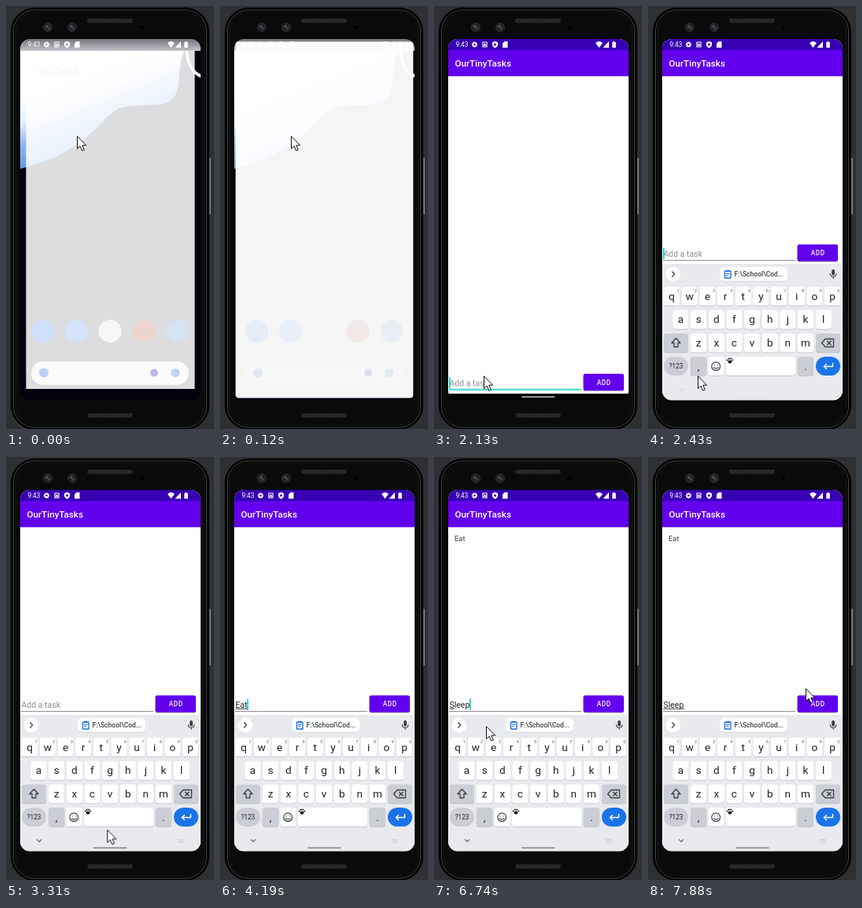
Animation of 264 by 538 pixels, one loop 8000 ms. Source, as an HTML page:

```html
<!DOCTYPE html>
<html lang="en">
<head>
<meta charset="utf-8">
<title>To-do app on a phone</title>
<style>
html, body { margin: 0; width: 100%; height: 100%; overflow: hidden; background: #302f33; }
svg { display: block; width: 264px; height: 538px; font-family: Roboto, sans-serif; }
.medium { font-weight: 500; }
.line { fill: none; stroke: currentColor; stroke-linecap: round; stroke-linejoin: round; }
.mid { text-anchor: middle; }
#pointer, #splash, #icons, #app, #field, #keyboard, #nav, #home, #status {
  animation: 8s step-end infinite;
}
#splash { animation-name: open; transform-origin: 132.2px 272px; }
@keyframes open {
  0% { transform: scale(.935); opacity: .865; }
  1.5% { transform: scale(.985); opacity: .96; }
  3.125%, 100% { transform: none; opacity: 1; }
}
#icons { animation-name: leave; }
@keyframes leave {
  0% { opacity: 1; }
  1.5% { opacity: .35; }
  3.125%, 100% { opacity: 0; }
}
#app { animation-name: reveal; }
@keyframes reveal {
  0% { opacity: 0; transform: translateY(1px); }
  12.19% { opacity: 1; transform: translateY(1px); }
  14.12%, 100% { opacity: 1; transform: none; }
}
#status { animation-name: tint; }
@keyframes tint {
  0% { color: #fff; }
  3.125% { color: #40335c; }
  15.6%, 100% { color: #fff; }
}
#field { animation-name: lift; }
@keyframes lift {
  0% { transform: translateY(164.5px); }
  30.3%, 100% { transform: none; }
}
#keyboard { animation-name: rise; }
@keyframes rise {
  0% { transform: translateY(180px); }
  28.45% { transform: translateY(80px); }
  30.3%, 100% { transform: none; }
}
#nav { animation-name: settle; }
@keyframes settle {
  0% { opacity: .15; }
  32.2%, 100% { opacity: 1; }
}
#home { animation-name: home; }
@keyframes home {
  0% { fill: transparent; }
  3.125% { fill: #999; }
  14.12% { fill: #eee; }
  30.3% { fill: #dfe1e4; }
  32.2%, 100% { fill: #6b6d70; }
}
#pointer { animation-name: wander; }
@keyframes wander {
  0% { transform: translate(90px, 165px); }
  3.25% { transform: translate(90px, 165px); animation-timing-function: steps(6, start); }
  14% { transform: translate(83px, 495.5px); }
  15.6% { transform: translate(83px, 495.5px); animation-timing-function: steps(7, start); }
  28.4% { transform: translate(63px, 470px); }
  37.85% { transform: translate(63px, 470px); animation-timing-function: steps(5, start); }
  46.9% { transform: translate(226px, 479px); }
  48.45% { transform: translate(300px, 479px); }
  56.06% { transform: translate(256px, 444px); animation-timing-function: steps(3, start); }
  61.5% { transform: translate(210px, 314px); }
  63.25% { transform: translate(210px, 314px); animation-timing-function: steps(4, start); }
  70.25% { transform: translate(66px, 342px); }
  91.7% { transform: translate(66px, 342px); animation-timing-function: steps(5, start); }
  100% { transform: translate(200px, 294px); }
}
</style>
</head>
<body>
<svg viewBox="0 0 264 538">
  <defs>
    <clipPath id="screen"><rect x="18" y="42" width="229" height="459.5" rx="12"/></clipPath>
    <linearGradient id="sky" gradientUnits="userSpaceOnUse" x1="80" y1="60" x2="125" y2="170">
      <stop offset=".25" stop-color="#fff"/>
      <stop offset=".5" stop-color="#e3eefc"/>
      <stop offset=".72" stop-color="#8db7ee"/>
      <stop offset="1" stop-color="#5a94e2"/>
    </linearGradient>
    <linearGradient id="shade" x2="0" y2="1">
      <stop stop-color="#77737d"/>
      <stop offset="1" stop-color="#c4c2c9"/>
    </linearGradient>
    <linearGradient id="fade" x2="0" y2="1">
      <stop offset=".1" stop-color="#fff" stop-opacity=".41"/>
      <stop offset=".92" stop-color="#fff" stop-opacity=".84"/>
      <stop offset=".972" stop-color="#fff"/>
    </linearGradient>
    <pattern id="mesh" width="6" height="6" patternUnits="userSpaceOnUse" patternTransform="skewX(-30)">
      <rect width="6" height="6" fill="#101010"/>
      <path d="M1 0V6M4 0V6" stroke="#444" stroke-width="1.3"/>
    </pattern>
  </defs>

  <rect width="264" height="538" fill="#302f33"/>
  <rect x="257.5" y="193" width="2.5" height="72" rx="1" fill="#77777a"/>
  <rect x="6.5" y="2.5" width="251" height="536" rx="30" fill="#050505" stroke="#000"/>
  <rect x="9.5" y="5" width="245" height="531" rx="27" fill="#070707" stroke="#3f3f41"/>
  <rect x="12.5" y="8" width="239" height="525" rx="24" fill="#0a0a0a" stroke="#161617"/>
  <rect x="103" y="16" width="58" height="5.5" rx="2.7" fill="url(#mesh)"/>
  <rect x="103" y="518" width="58" height="5.5" rx="2.7" fill="url(#mesh)"/>
  <g fill="#202226" stroke="#2d2f33">
    <circle cx="53" cy="27" r="5.5"/><circle cx="84" cy="27" r="5.5"/>
    <circle cx="172" cy="27" r="4" fill="#030303" stroke="#111"/>
  </g>
  <g fill="#4d5359">
    <circle cx="52" cy="26" r="1.8"/><circle cx="54.5" cy="28.5" r="1.2"/>
    <circle cx="83" cy="26" r="1.8"/><circle cx="85.5" cy="28.5" r="1.2"/>
  </g>

  <g clip-path="url(#screen)">
    <g data-toggle="0 250">
      <rect x="18" y="42" width="229" height="460" fill="#02020f"/>
      <path fill="url(#sky)" d="M18 207C50 200 85 184 110 160S136 129 160 127S207 129 215 113S217 80 226 57L230 42H18Z"/>
      <path d="M229 50Q229 84 250 90" fill="none" stroke="#eef" stroke-width="4"/>
      <rect x="18" y="42" width="229" height="15" fill="url(#shade)"/>
    </g>
    <rect id="splash" x="18" y="42" width="229" height="460" fill="#fff"/>
    <g id="icons">
      <text x="37" y="87" font-size="11.5" fill="#f3f3f6">Thu, Dec 8</text>
      <circle cx="46.5" cy="413.5" r="14.5" fill="#cfe0f8"/>
      <circle cx="89.5" cy="413.5" r="14.5" fill="#d3e4fa"/>
      <circle cx="132" cy="413.5" r="14.5" fill="#f6f7f7"/>
      <circle cx="175" cy="413.5" r="14.5" fill="#ecd5cd"/>
      <circle cx="218" cy="413.5" r="14.5" fill="#d5e3f2"/>
      <rect x="32" y="452" width="200" height="30" rx="15" fill="#fbfbfc"/>
      <circle cx="48" cy="466.5" r="6" fill="#bcd0f5"/>
      <circle cx="188" cy="466.5" r="5" fill="#c0b5e6"/>
      <circle cx="215" cy="466.5" r="5.5" fill="#bfd3f6"/>
    </g>

    <g id="app">
      <rect x="18" y="42" width="229" height="14" fill="#3700b3"/>
      <rect x="18" y="56" width="229" height="33.3" fill="#6200ee"/>
      <text class="medium" x="26.5" y="77" font-size="11.66" fill="#fff">OurTinyTasks</text>
      <rect x="18" y="493" width="229" height="9" fill="#000" data-toggle="1130"/>
      <text x="26" y="107" font-size="9.4" fill="#3a3a3a" data-toggle="5085">Eat</text>
      <g id="field">
        <g data-toggle="1130">
          <text x="19.5" y="319" font-size="10.5" fill="#8e8e8e" data-toggle="0 3605 5085 6225">Add a task</text>
          <rect x="19" y="323" width="168" height="1" fill="#8d8d95"/>
          <rect x="19" y="322.5" width="168" height="2" fill="#1fd3c2" data-toggle="1980 2425"/>
          <g id="typing" font-size="10.5" fill="#222"></g>
        </g>
        <rect x="190" y="304" width="51" height="22" rx="2.5" fill="#000" opacity=".2"/>
        <rect x="189.5" y="303.3" width="51.5" height="21.5" rx="2.5" fill="#6200ee"/>
        <text class="medium mid" x="215.8" y="317" font-size="8.17" letter-spacing=".7" fill="#fff">ADD</text>
      </g>
      <rect x="18" y="42" width="229" height="460" fill="url(#fade)" data-toggle="0 1130"/>
    </g>

    <g id="status" fill="currentColor" color="#fff">
      <text x="27.5" y="52" font-size="8.2">9:43</text>
      <circle cx="51.5" cy="49" r="2.2" class="line" stroke-width="1.8"/>
      <circle cx="51.5" cy="49" r="3.5" class="line" stroke-width="1" stroke-dasharray="1 1.7" style="stroke-linecap:butt"/>
      <path class="line" stroke-width="1.2" d="M62 46H67V52H62ZM63.5 50.5L64.5 48L65.5 50.5"/>
      <path fill-rule="evenodd" d="M77.5 44.8L81 46.2V49Q81 52 77.5 53.4Q74 52 74 49V46.2ZM77.5 47.5a1.5 1.5 0 1 0 .1 0Z"/>
      <path d="M89.5 45H93.5V53H87V47.5Z"/>
      <path d="M205 47Q209.5 43.2 214 47L209.5 53ZM222 45V53H214.5ZM226.3 46H227.5V45H229.5V46H230.8V53H226.3Z"/>
    </g>

    <g id="keyboard" color="#3c4043">
      <rect x="18" y="328" width="229" height="174" fill="#e8eaed"/>
      <circle cx="32" cy="341" r="9.3" fill="#fff"/>
      <path class="line" d="M30.8 338L33.8 341L30.8 344" stroke-width="1.3"/>
      <rect x="91" y="332.5" width="86" height="18" rx="5" fill="#000" opacity=".13"/>
      <rect x="91" y="332" width="86" height="17.7" rx="5" fill="#fff"/>
      <g color="#1a73e8">
        <path class="line" stroke-width="1.4" d="M97.5 337.2H105V346H97.5Z"/>
        <path class="line" stroke-width="1" d="M99.5 340.5H103M99.5 342.7H102M99.5 336.5H103"/>
      </g>
      <text class="medium" x="109.5" y="344.2" font-size="8.5" fill="#3c4043">F:\School\Cod...</text>
      <rect x="233.2" y="335" width="3.8" height="7.5" rx="1.9" fill="#3c4043"/>
      <path class="line" stroke-width="1.1" d="M231.3 340.5Q231.5 344.3 235.1 344.3T238.9 340.5M235.1 344.5V346.5"/>
      <g id="keys"></g>
      <path class="line" stroke-width="1.3" d="M35.5 422.5L41 428.5H38V433.5H33V428.5H30Z"/>
      <path class="line" stroke-width="1.3" d="M225 423.5H235.5V433.5H225L220.5 428.5ZM227.5 426.2L232.2 430.8M232.2 426.2L227.5 430.8"/>
      <circle class="line" cx="86.2" cy="458.2" r="5.4" stroke-width="1.2"/>
      <path class="line" stroke-width="1.2" d="M83.4 459.6Q86.2 462.8 89 459.6M84.3 456.5v.2M88.1 456.5v.2"/>
      <path class="line" color="#fff" stroke-width="1.4" d="M234.5 454.5V458.5H223.5M226.5 455.5L223.3 458.5L226.5 461.5"/>
      <g fill="#111">
        <ellipse cx="104" cy="452.5" rx="2.4" ry="1.9"/>
        <circle cx="100.6" cy="450.6" r="1"/><circle cx="102.6" cy="448.6" r="1.1"/>
        <circle cx="105.2" cy="448.5" r="1.1"/><circle cx="107.2" cy="450.5" r="1"/>
      </g>
      <g id="nav" color="#5f6368">
        <path class="line" stroke-width="1.2" d="M39.5 486.7L42.2 489.4L44.9 486.7"/>
        <path class="line" stroke-width="1.2" stroke-dasharray=".6 1.5" opacity=".7" d="M218.5 486.5H226.5M218.5 488.5H226.5M219.5 490.5H225.5" style="stroke-linecap:butt"/>
      </g>
    </g>
    <rect id="home" x="111" y="496.6" width="42.5" height="1.2" rx=".6"/>
  </g>

  <path id="pointer" d="M.5 .7V16.6L4.1 13.2L6.7 19L9.3 17.9L6.8 12.2H11.6Z" fill="#fff" stroke="#111" stroke-width="1"/>
</svg>
<script>
const LOOP = 8000;
const $ = id => document.getElementById(id);

function add(parent, tag, attrs, text = "") {
  const el = document.createElementNS("http://www.w3.org/2000/svg", tag);
  for (const name in attrs) el.setAttribute(name, attrs[name]);
  el.textContent = text;
  return parent.appendChild(el);
}

function key(x, y, width, label = "", fill = "#fff", radius = 3.5, size = 13.6) {
  const keys = $("keys");
  if (radius < 10) add(keys, "rect", { x, y: y + .8, width, height: 24, rx: radius, fill: "#b9bcc2" });
  add(keys, "rect", { x, y, width, height: 24, rx: radius, fill });
  add(keys, "text", { x: x + width / 2, y: y + (size < 10 ? 15.2 : 16.6), class: "mid", "font-size": size, fill: "#202124" }, label);
}

const PITCH = 22.65, GREY = "#cbced4";
[["qwertyuiop", 20, 357], ["asdfghjkl", 31.3, 386.7], ["zxcvbnm", 53.9, 416.4]].forEach(([row, x, y]) =>
  [...row].forEach((letter, i) => key(x + i * PITCH, y, 20.4, letter)));
[..."1234567890"].forEach((digit, i) =>
  add($("keys"), "text", { x: 38 + i * PITCH, y: 364, class: "mid", "font-size": 5.6, fill: "#5f6368" }, digit));
key(20, 416.4, 31, "", GREY);
key(213, 416.4, 31, "", GREY);
key(20, 446, 31, "?123", GREY, 12, 8.2);
key(53.9, 446, 20.4, ",", GREY);
key(76.3, 446, 20.4);
key(99, 446, 88);
key(189.7, 446, 20.4, ".", GREY);
key(213, 446, 31, "", "#1a73e8", 12);

const typing = $("typing");
const caret = (x, toggle) =>
  add(typing, "rect", { x, y: 307.5, width: 1.8, height: 14.5, fill: "#1fd3c2", "data-toggle": toggle });
const underline = (width, toggle) =>
  add(typing, "rect", { x: 19.5, y: 319.8, width, height: .9, "data-toggle": toggle });

// Each step is [text shown, start time, caret position].
function type(steps, caretOff, end) {
  steps.forEach(([text, start, x], i) => {
    const next = steps[i + 1]?.[1];
    add(typing, "text", { x: 19.5, y: 319, "data-toggle": `${start} ${next ?? end}` }, text);
    caret(x, `${start} ${next ?? caretOff}`);
  });
}
type([["E", 3605, 25.5], ["Ea", 3875, 31], ["Eat", 4035, 34.3]], 4635, 5085);
underline(6.2, "3605 4180");
underline(15, "4180 5085");
type([["S", 6225, 25.5], ["Sl", 6360, 28], ["Sle", 6485, 33.5], ["Slee", 6610, 39], ["Sleep", 6735, 45]], 7335, LOOP);
underline(6.5, "6225 7015");
underline(26.5, "7015");
caret(19, "1980 3030 3460 3605 5085 5485 5785 6225");

// Elements start hidden and flip at every listed time.
document.querySelectorAll("[data-toggle]").forEach(el => {
  const times = el.dataset.toggle.split(" ").map(Number);
  const frames = [{ offset: 0, opacity: 0 }];
  times.forEach((time, i) => frames.push({ offset: time / LOOP, opacity: (i + 1) % 2 }));
  frames.push({ offset: 1, opacity: times.length % 2 });
  frames.forEach(frame => frame.easing = "steps(1, end)");
  el.animate(frames, { duration: LOOP, iterations: Infinity });
});
</script>
</body>
</html>
```
